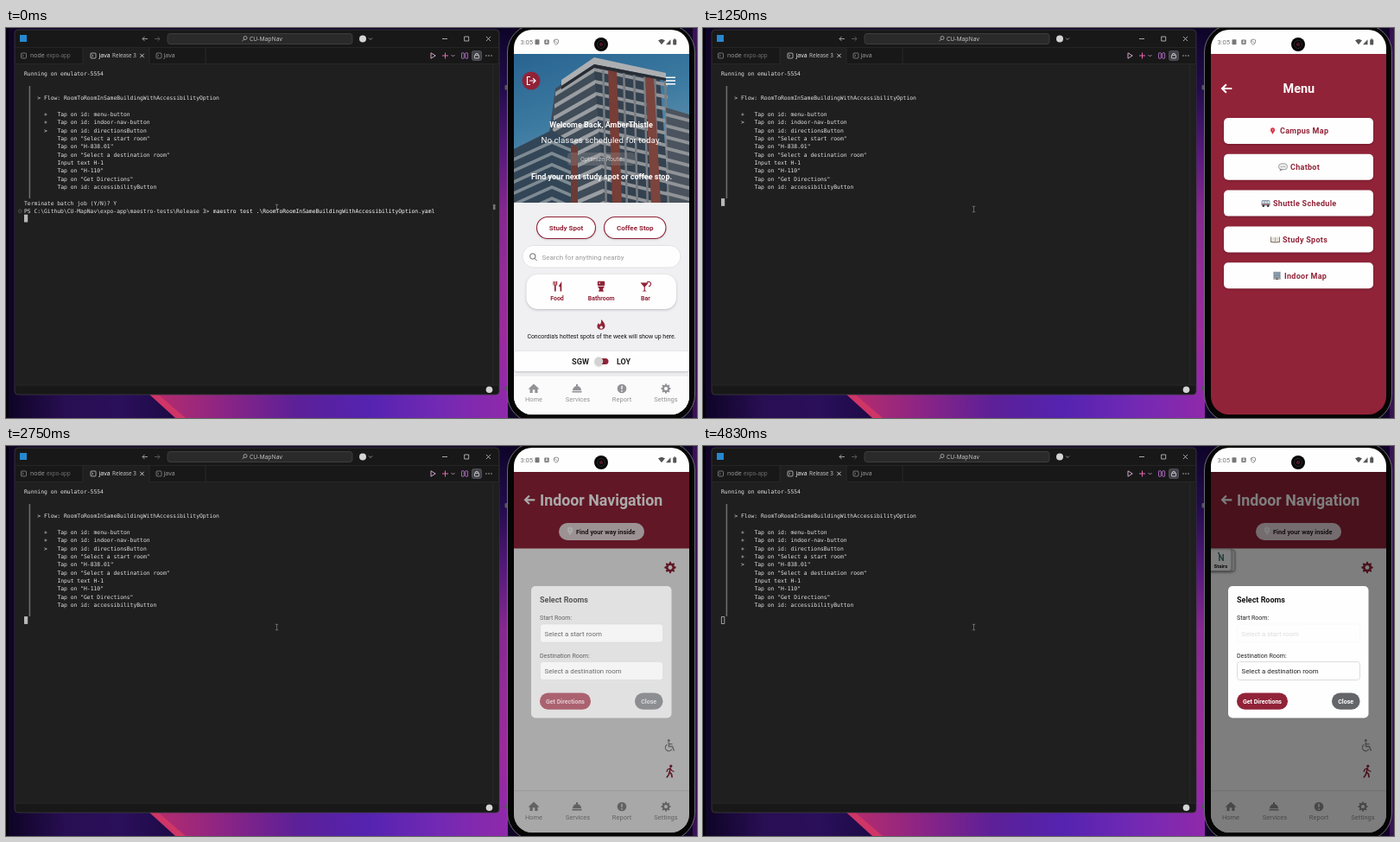
Write an HTML page with a canvas that moves like this. It is 800x451 px and loops after 5 s.

```html
<!DOCTYPE html>
<html lang="en">
<head>
<meta charset="utf-8">
<title>Indoor navigation test run</title>
<style>
html, body { margin: 0; width: 100%; height: 100%; overflow: hidden; background: #0c0420; }
canvas { display: block; width: 100vw; height: 100vh; }
</style>
</head>
<body>
<canvas id="stage"></canvas>
<script>
const W = 800, H = 451, LOOP = 5000, FPS = 12;
const RED = '#912338', GREY = '#929296', WHITE = '#fefefe';
const UI = '"Open Sans", "Noto Sans", sans-serif';
const APP = 'Roboto, sans-serif';
const MONO = '"DejaVu Sans Mono", "Liberation Mono", monospace';
const canvas = document.getElementById('stage');
const c = canvas.getContext('2d');
const dpr = window.devicePixelRatio || 1;
canvas.width = W * dpr;
canvas.height = H * dpr;

const ramp = (t, a, b) => Math.min(1, Math.max(0, (t - a) / (b - a)));

function box(x, y, w, h, r, fill, stroke, lw = 1) {
  c.beginPath();
  c.roundRect(x, y, w, h, r);
  if (fill) { c.fillStyle = fill; c.fill(); }
  if (stroke) { c.strokeStyle = stroke; c.lineWidth = lw; c.stroke(); }
}
function disc(x, y, r, fill) {
  c.beginPath();
  c.arc(x, y, r, 0, 7);
  c.fillStyle = fill;
  c.fill();
}
function arc(x, y, r, a, b, color, lw = 1) {
  c.beginPath();
  c.arc(x, y, r, a, b);
  c.strokeStyle = color;
  c.lineWidth = lw;
  c.stroke();
}
function path(p) {
  c.beginPath();
  for (let i = 0; i < p.length; i += 2) c.lineTo(p[i], p[i + 1]);
}
function poly(p, fill) { path(p); c.fillStyle = fill; c.fill(); }
function line(p, color, lw = 1) { path(p); c.strokeStyle = color; c.lineWidth = lw; c.stroke(); }

// y is the middle of the capital letters
function text(s, x, y, size, color, { bold, align = 'left', font = APP, gap = 0 } = {}) {
  c.font = `${bold ? 700 : 400} ${size}px ${font}`;
  c.letterSpacing = gap + 'px';
  c.textAlign = align;
  c.fillStyle = color;
  c.fillText(s, x, y + size * 0.355);
  c.letterSpacing = '0px';
}
const mid = { align: 'center' }, bold = { bold: true }, boldMid = { bold: true, align: 'center' };

function faded(alpha, draw) {
  c.save();
  c.globalAlpha *= alpha;
  draw();
  c.restore();
}
function shadowed(draw, blur = 3, color = 'rgba(0,0,0,.22)') {
  c.save();
  c.shadowColor = color;
  c.shadowBlur = blur * dpr;
  c.shadowOffsetY = dpr;
  draw();
  c.restore();
}
function blend(x0, y0, x1, y1, ...colors) {
  const g = c.createLinearGradient(x0, y0, x1, y1);
  colors.forEach((k, i) => g.addColorStop(i / (colors.length - 1), k));
  return g;
}

function wallpaper() {
  c.fillStyle = '#100526';
  c.fillRect(0, 0, W, H);
  c.fillStyle = blend(3, 0, 200, 0, '#0e0426', '#280e52', '#2a0f5a', '#1c0a45');
  c.fillRect(3, 424, 200, 27);
  poly([164, 422, 180, 422, 300, 451, 196, 451], '#cf3566');
  poly([174, 422, 581, 422, 581, 451, 208, 451],
    blend(174, 0, 581, 0, '#b52c6c', '#8a2486', '#5c2098', '#5423b0', '#7229b4', '#9029aa'));
  c.fillStyle = blend(0, 0, 0, 424, '#0d0428', '#220c4c', '#54197a', '#85288f', '#932b98', '#9c2a9c', '#9029aa');
  c.fillRect(571, 0, 12, 424);
  c.fillStyle = '#3a1256';
  c.fillRect(795, 0, 5, H);
  c.fillStyle = '#05020c';
  c.fillRect(0, 0, 3, H);
}

function shellIcon(x, color) {
  box(x - 3, 29, 6, 6, 1, null, color, .7);
  line([x - 1.7, 30.5, x - .2, 32, x - 1.7, 33.5], color, .7);
}
function chevron(x, y, color) { line([x - 2, y - 1, x, y + 1, x + 2, y - 1], color, .8); }
function cross(x, y, r, color) {
  line([x - r, y - r, x + r, y + r], color, .8);
  line([x - r, y + r, x + r, y - r], color, .8);
}
function arrow(x, y, r, dir, color, lw) {
  line([x - r * dir, y, x + r * dir, y], color, lw);
  line([x + (r - r * .85) * dir, y - r * .85, x + r * dir, y, x + (r - r * .85) * dir, y + r * .85], color, lw);
}

function editor() {
  box(10, 2, 561, 422, 4, '#181818', '#3a3a3f', .8);
  c.fillStyle = '#1f1f1f';
  c.fillRect(10.5, 41, 560, 372);
  c.fillRect(89, 22, 77, 19);
  line([10, 22.5, 571, 22.5], '#2b2b2b', .7);
  line([10, 41.5, 89, 41.5], '#2b2b2b', .7);
  line([166, 41.5, 571, 41.5], '#2b2b2b', .7);
  line([10, 413, 571, 413], '#2b2b2b', .7);
  for (const x of [89, 166, 231]) line([x, 22, x, 41], '#2f2f2f', .8);

  box(16, 8, 8, 8, 0, '#2588d0');
  arrow(161, 12.5, 3, -1, '#bbb', .8);
  arrow(175, 12.5, 3, 1, '#666', .8);
  box(187, 6.5, 214, 12, 3, '#2a2a2a', '#4a4a4a', .7);
  arc(277, 11.5, 2, 0, 7, '#ccc', .7);
  line([275.6, 13, 273.5, 15.2], '#ccc', .7);
  text('CU-MapNav', 282, 12.7, 6.8, '#ccc', { font: UI });
  disc(413, 12.5, 4, '#d4d4d4');
  chevron(422, 12.5, '#aaa');
  line([505, 12.5, 511, 12.5], '#ccc', .8);
  box(530.7, 10, 5, 5, 0, null, '#ccc', .8);
  cross(558.5, 12.5, 2.6, '#ccc');

  shellIcon(20.5, '#999');
  text('node', 28, 32, 7, '#a0a0a0', { font: UI });
  text('expo-app', 47, 32.2, 6.3, '#777', { font: UI });
  shellIcon(101, '#ddd');
  text('java', 107.5, 32, 7, '#fff', { font: UI });
  text('Release 3', 123, 32.2, 6.3, '#ccc', { font: UI });
  cross(157.5, 32, 2.2, '#eee');
  shellIcon(177, '#999');
  text('java', 182.5, 32, 7, '#a0a0a0', { font: UI });

  path([492, 28.8, 497.2, 32, 492, 35.2]);
  c.closePath();
  c.strokeStyle = '#e2b4dc';
  c.lineWidth = .9;
  c.stroke();
  line([505, 32, 512, 32], '#e468b4', 1);
  line([508.5, 28.5, 508.5, 35.5], '#e468b4', 1);
  chevron(517.5, 32, '#c9a0c9');
  box(527.5, 28.8, 2.8, 6.4, .5, null, '#c77adf', .8);
  box(531.8, 28.8, 2.8, 6.4, .5, null, '#c77adf', .8);
  box(539.5, 26.5, 11, 11, 2, '#42424a', '#66666e', .6);
  box(542.4, 31.4, 5.2, 3.6, .5, null, '#ddd', .8);
  arc(545, 31, 1.7, Math.PI, 0, '#ddd', .8);
  for (const x of [556, 559, 562]) disc(x, 32, .7, '#ccc');

  line([563.5, 42, 563.5, 413], '#2a2a2a', .8);
  disc(559.5, 418.3, 3.8, '#d4d4d4');
}

const COL = 3.839, ROW = 9.33;
function put(s, col, row, color = '#e2e2e2') {
  text(s, 21 + col * COL, 53.2 + row * ROW, 6.377, color, { font: MONO });
}
const steps = ['Tap on id: menu-button', 'Tap on id: indoor-nav-button', 'Tap on id: directionsButton',
  'Tap on "Select a start room"', 'Tap on "H-838.01"', 'Tap on "Select a destination room"',
  'Input text H-1', 'Tap on "H-110"', 'Tap on "Get Directions"', 'Tap on id: accessibilityButton'];

function terminal(t) {
  const old = t < 80;
  const blank = !old && t < 170 || t >= 830 && t < 915;
  const current = old ? 2 : [830, 1915, 3000, 4500].filter(at => t >= at).length;
  const row = old ? 18 : blank ? 0 : 16;
  if (!blank) {
    put('Running on emulator-5554', 0, 0);
    c.fillStyle = '#6c6c6c';
    c.fillRect(26.6, 67, 1.6, 130);
    put('> Flow: RoomToRoomInSameBuildingWithAccessibilityOption', 4, 3);
    steps.forEach((s, i) => {
      if (i <= current) put(i < current ? '+' : '>', 6, 5 + i);
      put(s, 10, 5 + i);
    });
  }
  if (old) {
    put('Terminate batch job (Y/N)? Y', 0, 16);
    put('PS C:\\Github\\CU-MapNav\\expo-app\\maestro-tests\\Release 3>', 0, 17);
    put('maestro test .\\RoomToRoomInSameBuildingWithAccessibilityOption.yaml', 57, 17, '#fff');
    arc(16.3, 211.8, 1.8, 0, 7, '#666', .7);
    c.fillStyle = '#777';
    c.fillRect(564, 204, 2.5, 6);
  }
  const y = 48.2 + row * ROW;
  if (t >= 4500) box(21.4, y, 3.4, 8, 0, null, '#c4c4c4', .8);
  else box(21, y - .4, 4.2, 8.8, 0, '#b8b8b8');
  const my = old ? 207.5 : 209.5;
  line([313.5, my - 3, 313.5, my + 3], '#888', .7);
  for (const d of [-3.2, 3.2]) line([311.8, my + d, 315.2, my + d], '#888', .7);
}

function gear(x, y, r, color, hole) {
  c.beginPath();
  for (let i = 0; i < 32; i++) {
    const a = i * Math.PI / 16, k = i % 4 < 2 ? r : r * .74;
    c.lineTo(x + Math.cos(a - .1) * k, y + Math.sin(a - .1) * k);
  }
  c.fillStyle = color;
  c.fill();
  disc(x, y, r * .36, hole);
}
function pin(x, y, r, color, dot) {
  disc(x, y - r * .5, r, color);
  poly([x - r * .9, y - r * .1, x + r * .9, y - r * .1, x, y + r * 1.6], color);
  disc(x, y - r * .5, r * .35, dot);
}

function navBar(top) {
  const bg = '#fbfbfb';
  c.fillStyle = bg;
  c.fillRect(588, top, 203, 447 - top);
  line([588, top, 791, top], '#dcdcdc', .7);
  poly([604.5, 417.5, 611, 411.5, 617.5, 417.5], GREY);
  poly([606.5, 416, 615.5, 416, 615.5, 422, 612.3, 422, 612.3, 418.3, 609.7, 418.3, 609.7, 422, 606.5, 422], GREY);
  c.beginPath();
  c.arc(661, 419, 5, Math.PI, 0);
  c.fillStyle = GREY;
  c.fill();
  c.fillRect(655.5, 419.8, 11, 1.7);
  c.fillRect(660, 412, 2, 2);
  disc(713, 417, 5.3, GREY);
  line([713, 413.8, 713, 417.8], bg, 1.4);
  disc(713, 419.8, .9, bg);
  gear(764, 417, 5.7, GREY, bg);
  ['Home', 'Services', 'Report', 'Settings'].forEach((s, i) =>
    text(s, 611 + i * 51, 429.7, 7.5, GREY, mid));
}

function photo() {
  c.save();
  c.beginPath();
  c.rect(588, 30, 203, 172);
  c.clip();
  c.fillStyle = blend(588, 30, 640, 202, '#2f74a8', '#478fbc', '#86b2cc');
  c.fillRect(588, 30, 203, 172);

  // tower: pale bands on the left face, window grid on the right one
  poly([636, 70, 680, 40, 700, 202, 618, 202], '#4b5866');
  poly([680, 40, 757, 58, 768, 202, 694, 202], '#3d4c5c');
  for (let i = 0; i < 12; i++) {
    const y = 46 + i * 14;
    poly([636 - i, y + 28, 681 + i, y, 681 + i, y + 5, 636 - i, y + 33], '#b3b8bd');
    poly([681 + i, y, 766, y + 18, 766, y + 22, 681 + i, y + 4], '#a9adb2');
  }
  for (let x = 690; x < 764; x += 12) poly([x, 44 + (x - 690) * .22, x + 2.5, 45 + (x - 690) * .22, x + 6, 202, x + 3.5, 202], '#8b9097');
  poly([697, 46, 707, 48, 713, 202, 702, 202], '#8a4740');
  poly([740, 56, 750, 58, 758, 202, 747, 202], '#8f4f47');
  poly([643, 60, 681, 34, 764, 52, 764, 58, 681, 42, 643, 67], '#c9cccf');
  poly([643, 67, 681, 42, 764, 58, 764, 61, 681, 46, 643, 71], '#2d333c');

  // lower wings
  poly([764, 92, 791, 100, 791, 202, 768, 202], '#56616d');
  for (let y = 102; y < 202; y += 13) poly([764, y - 4, 791, y + 3, 791, y + 7, 764, y], '#a7abb0');
  poly([588, 140, 632, 118, 660, 136, 660, 202, 588, 202], '#3b5265');
  for (let y = 142; y < 215; y += 13) poly([588, y + 8, 632, y - 12, 660, y, 660, y + 4, 632, y - 8, 588, y + 12], '#93a0aa');
  poly([654, 134, 662, 138, 662, 202, 654, 202], '#7d453f');
  c.fillStyle = 'rgba(0,0,0,.14)';
  c.fillRect(588, 30, 203, 172);
  c.restore();
}

function pill(x, w, label) {
  shadowed(() => box(x, 218.5, w, 25, 12.5, WHITE), 2.5);
  box(x, 218.5, w, 25, 12.5, null, RED, 1.1);
  text(label, x + w / 2, 231, 8, RED, boldMid);
}

function home() {
  c.fillStyle = '#f0f0f2';
  c.fillRect(588, 202, 203, 245);
  photo();
  disc(608, 61, 10.5, RED);
  line([607, 56.5, 603.5, 56.5, 603.5, 65.5, 607, 65.5], WHITE, 1.2);
  arrow(609.6, 61, 3.4, 1, WHITE, 1.2);
  for (const y of [57.3, 61, 64.7]) line([764, y, 775, y], WHITE, 1.4);
  text('Welcome Back, AmberThistle', 689, 112, 9.05, WHITE, boldMid);
  text('No classes scheduled for today.', 689, 130, 9.84, WHITE, mid);
  text('Find your next study spot or coffee stop.', 689.5, 172, 9, WHITE, boldMid);
  box(650, 144, 78, 15, 4, 'rgba(150,150,150,.3)');
  text('Optimize Route', 689, 151.5, 7.05, 'rgba(255,255,255,.62)', mid);

  pill(614.5, 68, 'Study Spot');
  pill(692.5, 71.5, 'Coffee Stop');
  box(598, 251.5, 183, 25.5, 12.7, WHITE, '#dedee0', .8);
  arc(609.8, 264, 3.2, 0, 7, '#666', 1);
  line([612, 266.4, 614.5, 269], '#666', 1);
  text('Search for anything nearby', 620.5, 264.8, 8, '#9a9a9a');

  shadowed(() => box(602.5, 285, 173.5, 40, 13, WHITE));
  for (const d of [-4, -2.2, -.4]) line([638 + d, 293, 638 + d, 297.5], RED, 1.1);
  line([635.8, 297, 635.8, 304.5], RED, 1.8);
  poly([639.8, 298.5, 643.3, 293, 643.3, 304.5, 641.5, 304.5, 641.5, 299.5], RED);
  box(684.8, 292.7, 8.4, 5.2, 1, RED);
  poly([685, 298.8, 693, 298.8, 691, 302, 692, 304.7, 686, 304.7, 687, 302], RED);
  line([686.2, 295, 688, 295], WHITE, .9);
  poly([734.5, 294.5, 744, 294.5, 739.8, 299.5, 739.8, 303.2, 742, 304.6, 736.5, 304.6, 738.7, 303.2, 738.7, 299.5], RED);
  arc(744, 296, 2.6, -2.4, 1.6, RED, 1.1);
  ['Food', 'Bathroom', 'Bar'].forEach((s, i) => text(s, 638 + i * 51.2, 313, 7, RED, boldMid));

  c.beginPath();
  c.moveTo(689, 337);
  c.bezierCurveTo(695, 342, 695, 348.5, 689, 348.8);
  c.bezierCurveTo(683, 348.5, 684, 343, 686, 341.2);
  c.quadraticCurveTo(687, 343.5, 688.2, 342.3);
  c.quadraticCurveTo(689.5, 340, 689, 337);
  c.fillStyle = RED;
  c.fill();
  disc(689.2, 346.2, 1.6, '#f0f0f2');
  text("Concordia's hottest spots of the week will show up here.", 689.5, 357, 6.93, '#111', mid);

  shadowed(() => box(588.5, 374, 202, 23, 3, WHITE));
  text('SGW', 655, 385.8, 9.2, '#222', bold);
  text('LOY', 707, 385.8, 9, '#222', bold);
  box(683, 382, 14.5, 7, 3.5, RED);
  shadowed(() => disc(686.3, 385.5, 4.9, '#d2d2d2'), 2);
  navBar(402);
}

const menuIcons = [
  (x, y) => pin(x, y, 2.5, '#d8313f', '#f4a4a8'),
  (x, y) => {
    box(x - 5, y - 4, 10, 7, 3.5, '#eee', '#888', .8);
    poly([x - 3, y + 2, x, y + 2.8, x - 4, y + 5], '#888');
    for (const d of [-2, 0, 2]) disc(x + d, y - .5, .6, '#777');
  },
  (x, y) => {
    box(x - 5, y - 3.5, 10, 6.5, 1.5, '#8d9aa5');
    for (const d of [-4, -1, 2]) box(x + d, y - 2.3, 2.2, 2.4, .3, '#d6e8f0');
    line([x - 5, y + 1.4, x + 5, y + 1.4], '#b0434c', .8);
    for (const d of [-2.7, 2.7]) disc(x + d, y + 3.2, 1.3, '#333');
  },
  (x, y) => {
    poly([x - 5.5, y - 3, x, y - 2, x + 5.5, y - 3, x + 5.5, y + 3.3, x, y + 4, x - 5.5, y + 3.3], '#7c6b60');
    poly([x - 4.6, y - 3.6, x, y - 2.4, x + 4.6, y - 3.6, x + 4.6, y + 2.4, x, y + 3.2, x - 4.6, y + 2.4], '#efece6');
    line([x, y - 2.4, x, y + 3.2], '#8a8580', .7);
    for (const d of [-3.4, 1.2]) for (const e of [-1, .8]) line([x + d, y + e, x + d + 2.2, y + e], '#aaa', .5);
  },
  (x, y) => {
    box(x - 4.3, y - 4.5, 8.6, 9.3, .4, '#a9aeb4');
    for (let i = 0; i < 9; i++) box(x - 3.3 + i % 3 * 2.5, y - 3.5 + (i / 3 | 0) * 2.4, 1.6, 1.6, 0, '#5e7f94');
    box(x - 1, y + 3.3, 2, 1.5, 0, '#604030');
  }
];
const menuItems = [['Campus Map', 668], ['Chatbot', 680], ['Shuttle Schedule', 660], ['Study Spots', 671], ['Indoor Map', 673]];

function menu(t) {
  c.fillStyle = RED;
  c.fillRect(588, 30, 203, 417);
  arrow(606.7, 70, 5.6, -1, WHITE, 2.2);
  text('Menu', 689.8, 70, 14.4, WHITE, boldMid);
  const press = 1 - .65 * (ramp(t, 1480, 1590) - ramp(t, 1590, 1900));
  menuItems.forEach(([label, x], i) => {
    const y = 104 + i * 41.8;
    faded(i === 4 ? press : 1, () => {
      shadowed(() => box(603, y, 173, 30, 5, WHITE));
      menuIcons[i](x - 8.5, y + 15);
      text(label, x, y + 15.2, 9, RED, { bold: true, gap: .3 });
    });
  });
}

function spinner(t) {
  const a = (t - 2330) / 1000 * Math.PI * 2;
  const stretch = .5 * Math.sin((t - 2330) / 220);
  arc(689, 258, 6.6, a + 1.0, a + 5.7 + stretch, RED, 1.7);
}

function indoor(t) {
  c.fillStyle = WHITE;
  c.fillRect(588, 118, 203, 281);
  c.fillStyle = RED;
  c.fillRect(588, 30, 203, 88.5);
  arrow(606.7, 62.3, 5.6, -1, WHITE, 2.2);
  text('Indoor Navigation', 618, 62.3, 17.8, WHITE, bold);
  box(640, 89, 99, 20, 10, '#e9dadd');
  pin(653, 98.5, 3.1, WHITE, '#e9dadd');
  text('Find your way inside', 660, 99.2, 7.5, '#2a2024', bold);
  gear(769, 140.5, 6.7, RED, WHITE);
  if (t < 2580) spinner(t);

  disc(767.3, 340.6, 1.5, GREY);
  line([767.3, 342.5, 767.5, 347.5, 771.5, 347.5, 773.5, 352.5], GREY, 1.5);
  line([767.5, 344.7, 771.5, 344.7], GREY, 1.2);
  arc(767.3, 348.7, 3.9, .5, 4.2, GREY, 1.3);
  disc(769.8, 370.2, 1.6, RED);
  line([769.2, 372.3, 768.2, 377.2, 770.5, 379.5, 771.2, 383.4], RED, 1.7);
  line([768.3, 377, 767, 380.5, 764.8, 383.4], RED, 1.6);
  line([765, 377, 765.8, 374.2, 769, 372.8, 771, 375.5, 773.5, 376.5], RED, 1.2);

  if (t >= 4660) {
    shadowed(() => {
      box(580, 120, 36, 25, 3, '#eee', '#999', .8);
      box(580, 119, 32, 25.5, 3, WHITE, '#aaa', .8);
    });
    text('N', 600, 129.5, 10, '#3f7a70', boldMid);
    disc(597, 124, 1.1, '#3f7a70');
    text('Stairs', 599.5, 138.7, 6, '#111', boldMid);
  }
  navBar(398.7);
}

function field(y, label, alpha) {
  faded(alpha, () => {
    box(618.5, y, 142, 21, 3, WHITE, '#d8d8d8', .9);
    text(label, 623.5, y + 10.8, 7.85, '#222');
  });
}
function dialog(t) {
  c.fillStyle = 'rgba(0,0,0,.5)';
  c.fillRect(588, 30, 203, 417);
  box(608, 162, 162.5, 152.5, 5, WHITE);
  text('Select Rooms', 618, 178.3, 9, '#111', bold);
  text('Start Room:', 618, 198.7, 7.05, '#222');
  field(206, 'Select a start room', 1 - .85 * ramp(t, 4660, 4830));
  text('Destination Room:', 618, 242.2, 7.05, '#222');
  field(249.6, 'Select a destination room', 1);
  box(618, 285.5, 59, 19.3, 9.6, RED);
  text('Get Directions', 647.5, 295.3, 7.05, WHITE, boldMid);
  box(728, 285.5, 32.5, 19.3, 9.6, '#646569');
  text('Close', 744.2, 295.3, 7.05, WHITE, boldMid);
}

function statusBar() {
  c.fillStyle = WHITE;
  c.fillRect(588, 2, 203, 28);
  text('3:05', 595.5, 16.3, 7.6, '#777');
  box(612.5, 13.3, 5, 6, .8, '#777');
  box(623.3, 13.5, 5.4, 5.6, 1, '#777');
  text('A', 626, 16.4, 4.5, WHITE, boldMid);
  path([634.3, 14, 637, 13, 639.7, 14, 639.2, 17.5, 637, 19.4, 634.8, 17.5]);
  c.closePath();
  c.strokeStyle = '#777';
  c.lineWidth = .8;
  c.stroke();
  line([635, 14.5, 639, 18], '#777', .7);
  poly([755, 14.2, 759, 12.8, 763, 14.2, 759, 19.3], '#555');
  poly([764, 19.2, 769.5, 13.2, 769.5, 19.2], '#555');
  box(772.2, 13.2, 4, 6.2, .7, '#555');
  c.fillRect(773.4, 12.4, 1.6, 1);
  disc(689, 19, 8, '#060606');
  arc(689, 19, 4.5, 0, 7, '#2a2a2e', 1);
  disc(689, 19, 2.2, '#4b1420');
}

function phone(t) {
  box(577.5, 66, 3, 5.5, 1, '#55555c');
  box(577.5, 414.5, 3, 5, 1, '#55555c');
  box(580.5, -4, 217, 460, 32, '#050505', '#77777d', .9);
  c.save();
  c.beginPath();
  c.roundRect(588, 2, 203, 445, 21);
  c.clip();
  if (t < 830) home();
  else {
    if (t < 1915) menu(t);
    faded(ramp(t, 1780, 1915), () => indoor(t));
    faded(ramp(t, 2590, 2830), () => dialog(t));
  }
  statusBar();
  c.restore();
}

function frame(now) {
  const step = Math.floor((now % LOOP + 4) * FPS / 1000);
  const t = step * 1000 / FPS % LOOP;
  c.setTransform(dpr, 0, 0, dpr, 0, 0);
  wallpaper();
  editor();
  terminal(t);
  phone(t);
  requestAnimationFrame(tick);
}
const start = performance.now();
function tick() { frame(performance.now() - start); }
tick();
</script>
</body>
</html>
```
